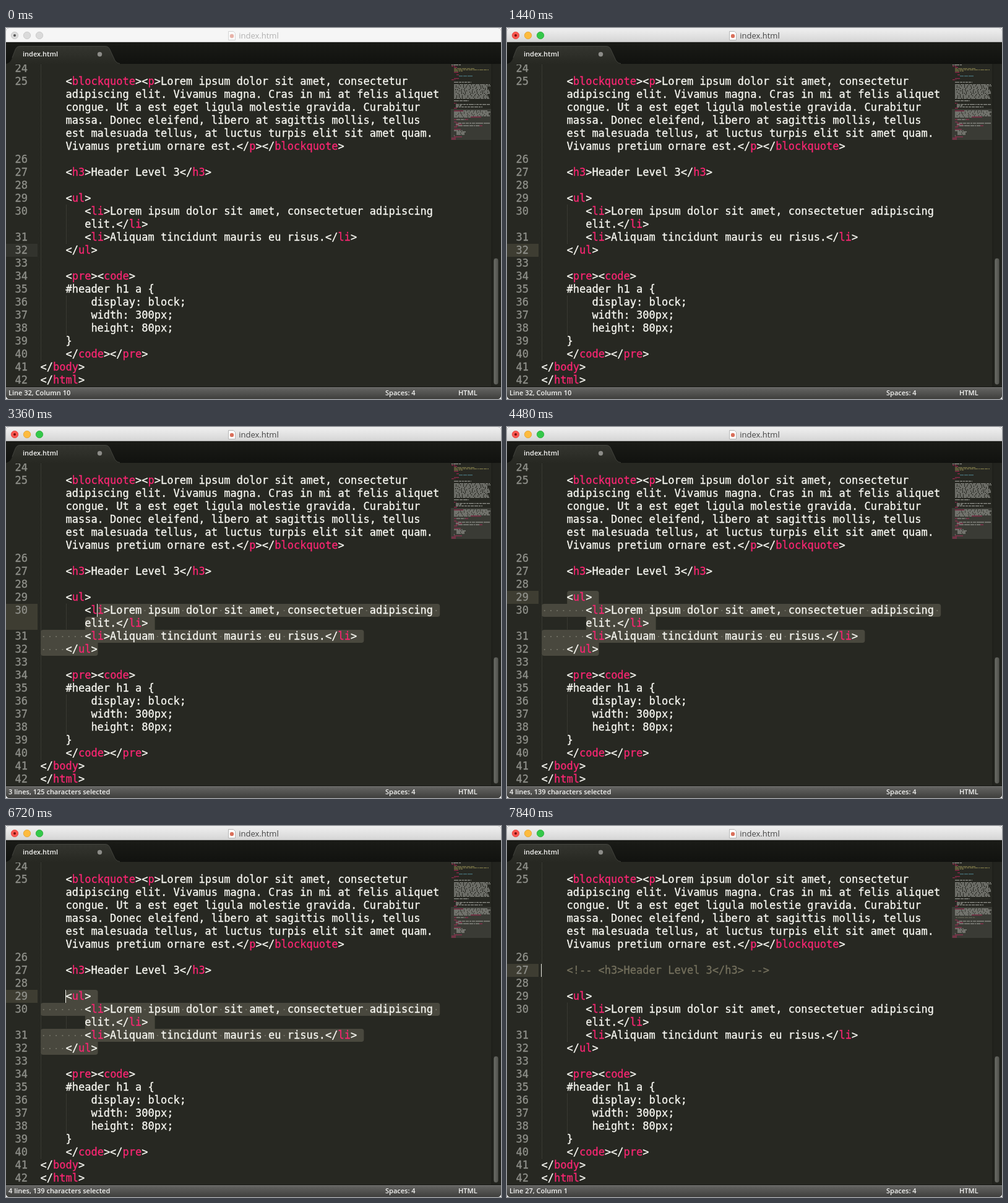
An HTML page for the animation above (8000 ms loop, 800 by 600 pixels).

```html
<!DOCTYPE html>
<html lang="en">
<head>
<meta charset="utf-8">
<title>index.html</title>
<style>
html, body { margin: 0; width: 100%; height: 100%; overflow: hidden; background: #fff; }
svg { display: block; width: 800px; height: 600px; }
.code { font: 17px "DejaVu Sans Mono", monospace; white-space: pre; stroke-width: .3px; }
.plain { fill: #f8f8f2; stroke: #f8f8f2; }
.tag { fill: #f92672; stroke: #f92672; }
.note { fill: #75715e; stroke: #75715e; }
.num { fill: #8f908a; stroke: #8f908a; text-anchor: end; }
.ui { font: 600 11px "Open Sans", sans-serif; fill: #f4f4f2; }
.title { font: 13px "Open Sans", sans-serif; text-anchor: middle; }
</style>
</head>
<body>
<svg viewBox="0 0 800 600">
  <defs>
    <linearGradient id="bar" x2="0" y2="1"><stop stop-color="#f0f0f0"/><stop offset="1" stop-color="#d5d5d5"/></linearGradient>
    <linearGradient id="tabs" x2="0" y2="1"><stop stop-color="#1a1b17"/><stop offset="1" stop-color="#11120f"/></linearGradient>
    <linearGradient id="tab" x2="0" y2="1"><stop stop-color="#34352f"/><stop offset="1" stop-color="#272822"/></linearGradient>
    <linearGradient id="foot" x2="0" y2="1"><stop stop-color="#686866"/><stop offset="1" stop-color="#3e3e3c"/></linearGradient>
    <linearGradient id="thumb"><stop stop-color="#6c6d68"/><stop offset="1" stop-color="#50514c"/></linearGradient>
    <clipPath id="win"><path d="M0 600V5Q0 0 5 0H795Q800 0 800 5V600z"/></clipPath>
    <clipPath id="page"><rect y="59" width="800" height="521"/></clipPath>
  </defs>
  <g clip-path="url(#win)">
    <rect width="800" height="600" fill="#272822"/>
    <g id="editor" clip-path="url(#page)"></g>
    <rect x="785" y="58" width="15" height="522" fill="#22231e"/>
    <rect x="784.5" y="58" width="1" height="522" fill="#1a1b17"/>
    <rect x="788" y="372" width="8" height="205" rx="4" fill="url(#thumb)" stroke="#171814" stroke-width=".6"/>
    <g id="map"></g>
    <rect y="23" width="800" height="35" fill="url(#tabs)"/>
    <path d="M0 59V58Q7 57 10 48L15 35Q17 29 23 29H160Q166 29 168 35L174 48Q177 57 184 58V59z" fill="url(#tab)"/>
    <path d="M10 48L15 35Q17 29.5 23 29.5H160Q166 29.5 168 35L174 48Q177 57 184 57.5" fill="none" stroke="#4a4b45" stroke-width=".8"/>
    <text class="ui" x="27" y="46">index.html</text>
    <circle cx="151.500" cy="42.500" r="3.700" fill="#8c8c88"/>
    <rect y="580" width="800" height="20" fill="url(#foot)"/>
    <rect y="580" width="800" height="1" fill="#191a17"/>
    <rect y="581" width="800" height="1" fill="#7a7a78"/>
    <g class="ui">
      <text id="status" x="4" y="594"></text>
      <text x="613" y="594">Spaces: 4</text>
      <text x="731" y="594">HTML</text>
    </g>
    <path d="M0 596V600H4Q1 599 0 596zM800 596V600H796Q799 599 800 596z" fill="#fff"/>
    <g id="head"></g>
  </g>
</svg>
<script>
const LOOP = 8000, STEP = 160, CW = 10.235, X0 = 55.5, TOP = 55, LH = 21;
const $ = id => document.getElementById(id);
const colX = c => X0 + c * CW;
const rowY = r => TOP + r * LH;
const rect = (x, y, w, h, fill, o = 1) =>
  `<rect x="${x}" y="${y}" width="${w}" height="${h}" fill="${fill}" opacity="${o}"/>`;

// line number, indent, text; wrapped rows have no number
const rows = [
  [24, 0, ''],
  [25, 4, '<blockquote><p>Lorem ipsum dolor sit amet, consectetur'],
  ['', 4, 'adipiscing elit. Vivamus magna. Cras in mi at felis aliquet'],
  ['', 4, 'congue. Ut a est eget ligula molestie gravida. Curabitur'],
  ['', 4, 'massa. Donec eleifend, libero at sagittis mollis, tellus'],
  ['', 4, 'est malesuada tellus, at luctus turpis elit sit amet quam.'],
  ['', 4, 'Vivamus pretium ornare est.</p></blockquote>'],
  [26, 0, ''],
  [27, 4, '<h3>Header Level 3</h3>'],
  [28, 0, ''],
  [29, 4, '<ul>'],
  [30, 7, '<li>Lorem ipsum dolor sit amet, consectetuer adipiscing '],
  ['', 7, 'elit.</li>'],
  [31, 7, '<li>Aliquam tincidunt mauris eu risus.</li>'],
  [32, 4, '</ul>'],
  [33, 0, ''],
  [34, 4, '<pre><code>'],
  [35, 4, '#header h1 a {'],
  [36, 8, 'display: block;'],
  [37, 8, 'width: 300px;'],
  [38, 8, 'height: 80px;'],
  [39, 4, '}'],
  [40, 4, '</code></pre>'],
  [41, 0, '</body>'],
  [42, 0, '</html>']
];

// at: start, row/col: caret, blink: phase origin, sel: selection runs to the end of line 32
const states = [
  { at: 0, row: 14, col: 9, blink: 800, status: 'Line 32, Column 10' },
  { at: 2560, row: 13, col: 9, sel: 1, status: '2 lines, 51 characters selected' },
  { at: 2880, row: 12, col: 9, sel: 1, status: '3 lines, 69 characters selected' },
  { at: 3360, row: 11, col: 9, sel: 1, status: '3 lines, 125 characters selected' },
  { at: 3680, row: 10, col: 8, sel: 1, status: '4 lines, 135 characters selected' },
  { at: 4000, row: 10, col: 4, blink: 3840, sel: 1, status: '4 lines, 139 characters selected' },
  { at: 4960, row: 10, col: 9, sel: 1, list: 1, status: '4 lines, 139 characters selected' },
  { at: 6560, row: 10, col: 4, sel: 1, status: '4 lines, 139 characters selected' },
  { at: 6880, row: 9, col: 0, status: 'Line 28, Column 1' },
  { at: 7200, row: 8, col: 0, status: 'Line 27, Column 1' },
  { at: 7520, row: 8, col: 0, head: 1, status: 'Line 27, Column 1' }
];

const esc = s => s.replace(/</g, '&lt;').replace(/>/g, '&gt;');
const markup = s => s.replace(/<(\/?)(\w+)>/g, '&lt;$1<tspan class="tag">$2</tspan>&gt;');
const muted = (s, r) => s.list && r >= 10 && r <= 14 || s.head && r === 8;

function lineText(s, r) {
  const open = s.list && r === 10 || s.head && r === 8;
  const close = s.list && r === 14 || s.head && r === 8;
  return (open ? '<!-- ' : '') + rows[r][2] + (close ? ' -->' : '');
}

function blinkLevel(t, origin) {
  const e = ((t - origin) % 1280 + 1280) % 1280;
  if (e < 240) return 1;
  if (e < 640) return Math.cos((e - 240) / 400 * Math.PI) / 2 + .5;
  if (e < 860) return 0;
  return .5 - Math.cos((e - 860) / 420 * Math.PI) / 2;
}

// rounds only the corners that no neighbouring row covers
function block(spans, i) {
  const { r, a, b } = spans[i], y = rowY(r), x = colX(a) + .7, w = colX(b) + .9, h = y + LH;
  const round = (n, c) => n && n.a <= c && c <= n.b ? 0 : 4;
  const up = spans[i - 1], dn = spans[i + 1];
  const [p, q, m, k] = [round(up, a), round(up, b), round(dn, b), round(dn, a)];
  return `<path fill="#49483e" d="M${x + p} ${y}H${w - q}Q${w} ${y} ${w} ${y + q}V${h - m}` +
    `Q${w} ${h} ${w - m} ${h}H${x + k}Q${x} ${h} ${x} ${h - k}V${y + p}Q${x} ${y} ${x + p} ${y}z"/>`;
}

function selection(s) {
  const spans = [];
  let dots = '';
  for (let r = s.row; r <= 14; r++) {
    const [num, indent, raw] = rows[r];
    const start = num ? 0 : indent;
    const text = ' '.repeat(indent) + (r === 14 ? raw : lineText(s, r));
    const a = r === s.row ? s.col : start;
    const b = text.length + (r === 11 || r === 14 ? 0 : 1);
    spans.push({ r, a, b });
    if (!s.list) for (let c = a; c < text.length; c++)
      if (text[c] === ' ') dots += rect(colX(c) + 4.3, rowY(r) + 10, 1.8, 1.8, '#77766a');
  }
  return spans.map((_, i) => block(spans, i)).join('') + dots;
}

const guide = (c, a, b) =>
  `<path d="M${Math.floor(colX(c)) + 1.5} ${rowY(a)}V${rowY(b)}" stroke="#4a4a42" stroke-dasharray="1 1"/>`;
const guides = guide(0, 0, 23) + guide(4, 11, 14) + guide(4, 18, 21);

function editor(s, t) {
  const active = t >= 320;
  let first = s.row, last = s.row;
  if (first === 12) first = 11;
  if (first === 11) last = 12;
  let out = rect(0, rowY(first), 51, (last - first + 1) * LH, active ? '#3e3d32' : '#32332d') + guides;
  if (s.sel) out += selection(s);
  rows.forEach(([num, indent], r) => {
    const y = rowY(r) + 16, text = lineText(s, r), dim = muted(s, r);
    out += `<text class="code num" x="35" y="${y}">${num}</text>` +
      `<text class="code ${dim ? 'note' : 'plain'}" x="${colX(indent)}" y="${y}">${dim ? esc(text) : markup(text)}</text>`;
  });
  if (active) out += rect(Math.floor(colX(s.col)), rowY(s.row), 1, LH, '#f8f8f0', blinkLevel(t, s.blink ?? s.at));
  return out;
}

// upper part of the minimap: row, indent, length, colour
const PINK = '#f92672', GOLD = '#c9bd6a', BLUE = '#66b9d0', PALE = '#f8f8f2';
const upper = [
  [0, 0, 15, PALE], [1, 0, 6, PINK], [2, 4, 6, PINK], [3, 4, 34, GOLD], [4, 4, 56, GOLD],
  [5, 4, 14, GOLD], [6, 4, 7, PINK], [8, 8, 4, PINK], [9, 12, 22, BLUE], [11, 4, 8, PINK],
  [12, 0, 6, PINK], [14, 4, 28, PALE], [29, 4, 24, PALE], [31, 4, 4, PINK], [32, 7, 55, PALE],
  [33, 7, 10, PALE], [34, 7, 43, PALE], [35, 4, 5, PINK]
];
for (let r = 16; r < 28; r++) upper.push([r, 4, 54 + r * 7 % 6, PALE]);

function upperMap() {
  let seed = 7, out = '';
  const next = () => (seed = seed * 16807 % 2147483647) / 2147483647;
  for (const [r, indent, len, fill] of upper)
    for (let c = 0; c < len;) {
      const w = Math.min(len - c, 2 + Math.floor(next() * 7));
      out += rect(720 + indent + c, 59 + r * 2, w, 1.3, fill, .5);
      c += w + 1;
    }
  return out;
}
const mapTop = upperMap();

function minimap(s) {
  let out = rect(719, 131, 65, 50, '#3a3b35') + mapTop;
  rows.forEach(([, indent], r) => {
    for (const m of lineText(s, r).matchAll(/<\/?\w+>|[^\s<]+/g)) {
      const fill = muted(s, r) ? '#9a967f' : m[0][0] === '<' ? PINK : PALE;
      out += rect(720 + indent + m.index, 131.4 + r * 2, m[0].length, 1.2, fill, .48);
    }
  });
  return out;
}

function titleBar(active) {
  const dots = active ? ['#fc5650', '#fdbb3e', '#34c84a'] : ['#dadada', '#dadada', '#dadada'];
  const edges = active ? ['#dd4640', '#dfa02c', '#27aa35'] : ['#c6c6c6', '#c6c6c6', '#c6c6c6'];
  return rect(0, 0, 800, 23, active ? 'url(#bar)' : '#f6f6f6') +
    rect(0, 22, 800, 1, active ? '#b0b0b0' : '#d2d2d2') +
    dots.map((f, i) => `<circle cx="${14 + 20 * i}" cy="12" r="5.700" fill="${f}" stroke="${edges[i]}" stroke-width=".8"/>`).join('') +
    `<circle cx="14" cy="12" r="2" fill="${active ? '#75110d' : '#555'}"/>` +
    `<g opacity="${active ? 1 : .5}"><path d="M359.500 5.500H367.500L370.500 8.500V19.500H359.500z" fill="#fff" stroke="#b4b4b4"/>` +
    `<circle cx="365" cy="13" r="3.200" fill="#d9705c"/></g>` +
    `<text class="title" x="408.500" y="17" fill="${active ? '#444' : '#b0b0b0'}">index.html</text>`;
}

let shown = -1;
function draw(now) {
  const t = Math.floor(now % LOOP / STEP) * STEP;
  if (t !== shown) {
    shown = t;
    const s = states.filter(v => v.at <= t).pop();
    $('editor').innerHTML = editor(s, t);
    $('map').innerHTML = minimap(s);
    $('head').innerHTML = titleBar(t >= 320);
    $('status').textContent = s.status;
  }
}
function tick() {
  draw(performance.now());
  requestAnimationFrame(tick);
}
tick();
</script>
</body>
</html>
```
